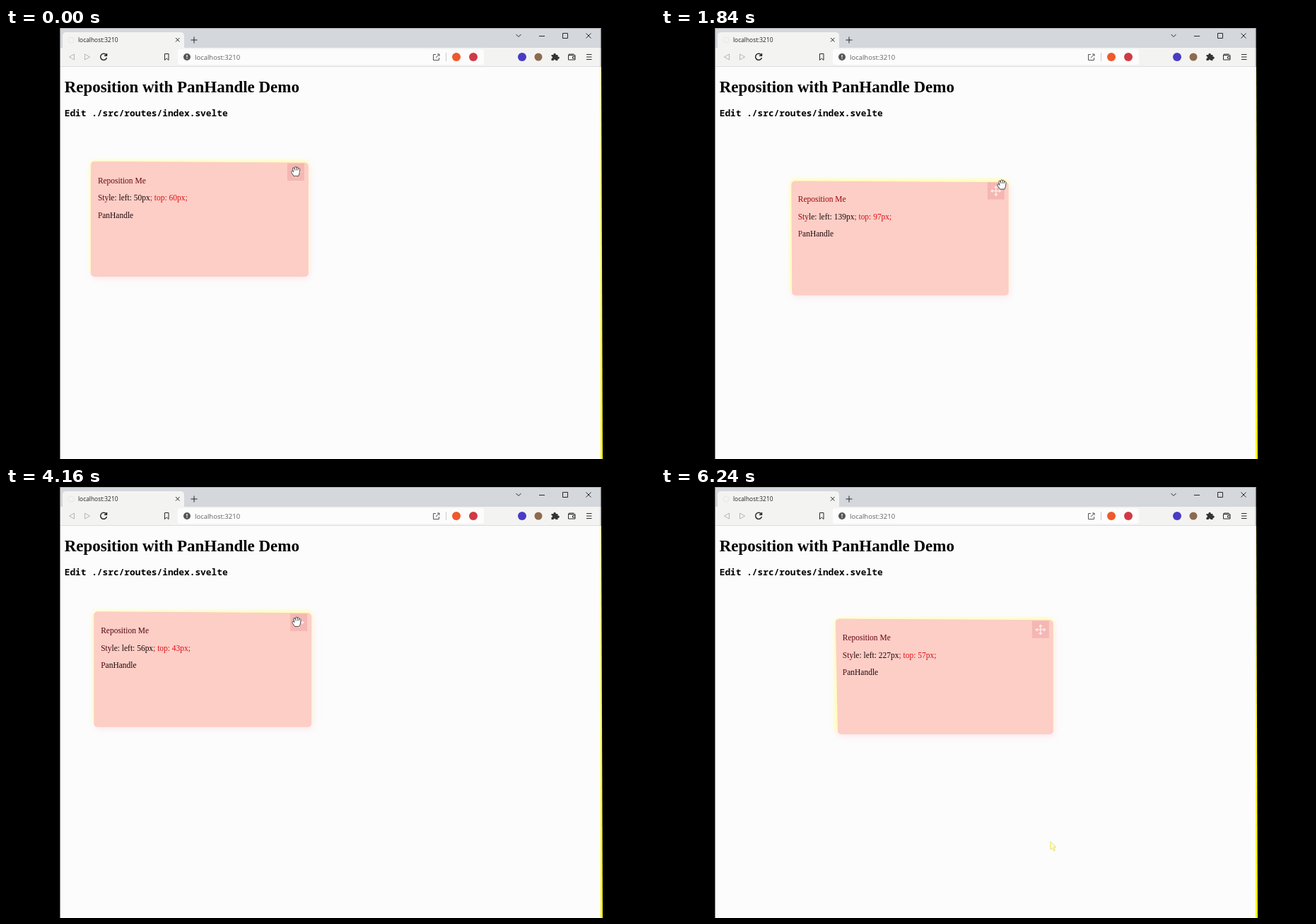
Recreate the animation shown at these times as an HTML page. Size 918x610 px, loop 6.64 s.

```html
<!DOCTYPE html>
<html lang="en">
<head>
<meta charset="utf-8">
<title>Reposition demo</title>
<style>
  html, body { margin: 0; width: 100%; height: 100%; overflow: hidden; background: #000; }
  svg { display: block; }
  .ui { font-family: "Open Sans", sans-serif; }
  .serif { font-family: "Liberation Serif", serif; }
  .mono { font-family: "Noto Sans Mono", monospace; }
  .line { fill: none; stroke: #2a2a2a; stroke-width: 1; }
</style>
</head>
<body>
<svg width="918" height="610" viewBox="0 0 918 610">
  <defs>
    <filter id="soft" x="-10%" y="-15%" width="120%" height="130%"><feGaussianBlur stdDeviation="2"/></filter>
    <filter id="wide" x="-15%" y="-20%" width="130%" height="140%"><feGaussianBlur stdDeviation="5"/></filter>
    <linearGradient id="edge" x2="0" y2="1">
      <stop stop-color="#ffffa8"/><stop offset=".4" stop-color="#fffb30"/><stop offset="1" stop-color="#fff500"/>
    </linearGradient>
  </defs>

  <!-- browser window -->
  <path fill="#fcfcfd" d="M76.5 0H841L843 610H76.5z"/>
  <path fill="url(#edge)" d="M840.500 55h1.500L844 610h-3z"/>
  <path fill="#d4d7db" d="M77 0H841V29H77z"/>
  <path fill="#a9abae" d="M77 0H841V1H77z"/>
  <path fill="#f3f3f2" d="M77 28H841.500V54H77zM80 28V11q0-5 5-5H247q5 0 5 5V28z"/>
  <path fill="#dedede" d="M77 54H841.500V55H77z"/>
  <path fill="#b9babb" d="M840.500 0h1.200V55h-1.200z"/>
  <rect x="243" y="30" width="433" height="22" rx="3" fill="#fcfcfc"/>
  <circle cx="92" cy="17" r="4" fill="none" stroke="#e9e7df"/>
  <g class="ui">
    <text x="102" y="20" font-size="8.4" fill="#222">localhost:3210</text>
    <text x="267" y="44.500" font-size="9.5" fill="#606060">localhost:3210</text>
  </g>
  <g class="line">
    <path d="M240 14l5.500 5.500m0-5.500l-5.500 5.500M261.500 17h9m-4.500-4.500v9"/>
    <path d="M721.500 9l3.500 3.500 3.500-3.500M754 11.500h8M787.500 7.500h7v7h-7zM820.500 7.500l7 7m0-7l-7 7"/>
    <path stroke="#b5b5b5" d="M96.500 37v8l-7-4zM111.500 37v8l7-4z"/>
    <path stroke-width="1.500" d="M142 38.500a4.500 4.500 0 1 0 .5 3.500M142.500 36v3.200h-3.500"/>
    <path d="M224.500 36.500h5.500v9l-2.750-2.500-2.750 2.500z"/>
    <path stroke="#555" d="M608 37.500h-3.500v8h8v-3.500M610 37h3v3M613 37l-5 5"/>
    <path stroke="#ccc" d="M622.500 35v12"/>
    <path d="M795.500 38.500v6.500h9.500v-6.500h-9.500q0-1.500 1.500-1.500h6.500M805 40.500h-3.500v2.500h3.500M821 37.500h7.500m-7.500 3.500h7.500m-7.500 3.500h7.500"/>
  </g>
  <circle cx="256" cy="41" r="5" fill="#555"/>
  <path stroke="#fff" stroke-width="1.300" d="M256 38v3.500m0 1v1.300"/>
  <circle cx="637" cy="41" r="6" fill="#ee5a2b"/>
  <circle cx="661" cy="41" r="6" fill="#cf3b45"/>
  <circle cx="730" cy="41" r="6" fill="#4a3bc4"/>
  <circle cx="753" cy="41" r="5.500" fill="#8c6b4c"/>
  <path fill="#333" d="M771.500 38h3a1.700 1.700 0 1 1 3.200 0h2.800v2.600a1.700 1.700 0 1 1 0 3.200v2.200h-3a1.500 1.500 0 0 0-3 0h-3v-3a1.500 1.500 0 0 0 0-3z"/>

  <text class="serif" x="82.700" y="90.500" font-size="22.960" font-weight="700">Reposition with PanHandle Demo</text>
  <text class="mono" x="82.700" y="124.500" font-size="12.830" font-weight="600">Edit ./src/routes/index.svelte</text>

  <!-- draggable card -->
  <g id="card">
    <rect x="2" y="4" width="308" height="162" rx="6" fill="#fbdcdf" opacity=".6" filter="url(#wide)"/>
    <rect x="-1.500" y="-2" width="309.500" height="161" rx="6" fill="#ffffb8" filter="url(#soft)"/>
    <path id="panel" fill="#fccec6" stroke="#fccec6" stroke-width="10" stroke-linejoin="round"/>
    <path id="handle" fill="#f5b7b3"/>
    <path fill="none" stroke="#fdecea" stroke-width="1.400"
      d="M283.500 15h13M290 8.500v13M288 10.500l2-2 2 2M288 19.500l2 2 2-2M285.500 13l-2 2 2 2M294.500 13l2 2-2 2"/>
    <g class="serif" font-size="11.480">
      <text class="tint" x="10" y="30.500">Reposition Me</text>
      <text x="10" y="55" fill="#1c060a"><tspan class="tint">Sty</tspan>le: left: <tspan id="left"></tspan>px<tspan id="top" fill="#dc1018"></tspan></text>
      <text x="10" y="79.500" fill="#1c060a"><tspan class="tint">P</tspan>anHandle</text>
    </g>
  </g>

  <path id="hand" fill="#fff" stroke="#222" stroke-width=".8" stroke-linejoin="round"
    d="M-2.800 6.500L-6 1.800Q-7-.2-5.500-.8-4.300-1-3.300.8L-4.400-3.800Q-4.400-5.400-3.300-5.400-2.300-5.400-1.900-3.700-2-6.800-.5-6.800.8-6.800.9-4.900 1.100-6.500 2.400-6.300 3.500-5.900 3.300-3.800 3.800-4.900 4.900-4.400 6-3.800 5.700-1.500 5.500 3.200 3.800 6.500zM-1.900-3.700L-1.300-1.500M.9-4.900V-1.500M3.300-3.800L3-1.500"/>
  <path id="arrow" fill="#fdfdd8" stroke="#eadf62" stroke-linejoin="round" d="M0 0V11L2.500 8.700 4.500 13 6.300 12.200 4.400 8H8z"/>
</svg>
<script>
const LOOP = 6640, STEP = 40, SCALE = 0.7175;
// time, card left, card top, pointer offset from the handle x, y
const keys = [
  [0, 50, 60, 0, 0], [320, 50, 60, 0, 0],
  [960, 110, 148, 0, 0], [1480, 110, 148, 0, 0],
  [1840, 139, 97, 8.5, -8], [2120, 168, 55, 0, 0], [2560, 168, 55, 0, 0],
  [2800, 128, 57, -13, 0], [3200, 75, 60, 0, 0],
  [3880, 56, 43, -3, 0], [4160, 56, 43, -3, 0],
  [4720, 120, 250, 0, 0], [4880, 120, 250, 0, 0],
  [5200, 147, 209, 2.5, -4.5], [5520, 186, 130, 0, 0],
  [5880, 227, 57, 0, 0], [6200, 227, 57, 14, 301], [LOOP, 227, 57, 14, 301]
];
const el = id => document.getElementById(id);
const tints = document.querySelectorAll('.tint');
const place = (id, x, y) => el(id).setAttribute('transform', `translate(${x} ${y})`);
const clamp = v => Math.max(0, Math.min(1, v));

// Tangents vanish at holds and turning points.
function tangent(i, c) {
  const a = keys[i - 1], b = keys[i], d = keys[i + 1];
  if (!a || !d || (b[c] - a[c]) * (d[c] - b[c]) <= 0) return 0;
  return (d[c] - a[c]) / (d[0] - a[0]);
}

function sample(t, c) {
  const i = keys.findIndex(k => k[0] > t) - 1;
  const a = keys[i], b = keys[i + 1], span = b[0] - a[0], u = (t - a[0]) / span;
  const ease = u * u * (3 - 2 * u);
  return a[c] + (b[c] - a[c]) * ease
    + span * u * (1 - u) * ((1 - u) * tangent(i, c) - u * tangent(i + 1, c));
}

function draw(now) {
  const t = Math.floor(now % LOOP / STEP) * STEP;
  const [left, top, dx, dy] = [1, 2, 3, 4].map(c => sample(t, c));
  const x = 84 + left * SCALE, y = 146 + top * SCALE;
  place('card', x, y);

  // The yellow fringe widens down and right across the page.
  const drop = Math.max(0, (y - 185) * 0.043);
  const inTop = Math.max(0, (y - 187) * 0.022), inBottom = Math.max(0, (x - 120) * 0.024);
  el('panel').setAttribute('d', `M${5 + inTop} ${4.5 + drop}L303 ${6.3 + drop}V158H${5 + inBottom}z`);
  el('handle').setAttribute('d', `M278 ${Math.max(2.5, 1.5 + drop)}H302V27H278z`);

  const red = clamp((top - 20) / 130);
  tints.forEach(n => n.style.fill = `rgb(${50 + 175 * red},5,18)`);
  el('left').textContent = Math.round(left);
  el('top').textContent = `; top: ${Math.round(top)}px;`;

  const away = dy > 15;
  el('hand').style.display = away ? 'none' : '';
  el('arrow').style.display = away ? '' : 'none';
  place(away ? 'arrow' : 'hand', x + 290 + dx, y + 14 + dy);
}

function frame() {
  draw(performance.now());
  requestAnimationFrame(frame);
}
frame();
</script>
</body>
</html>
```
